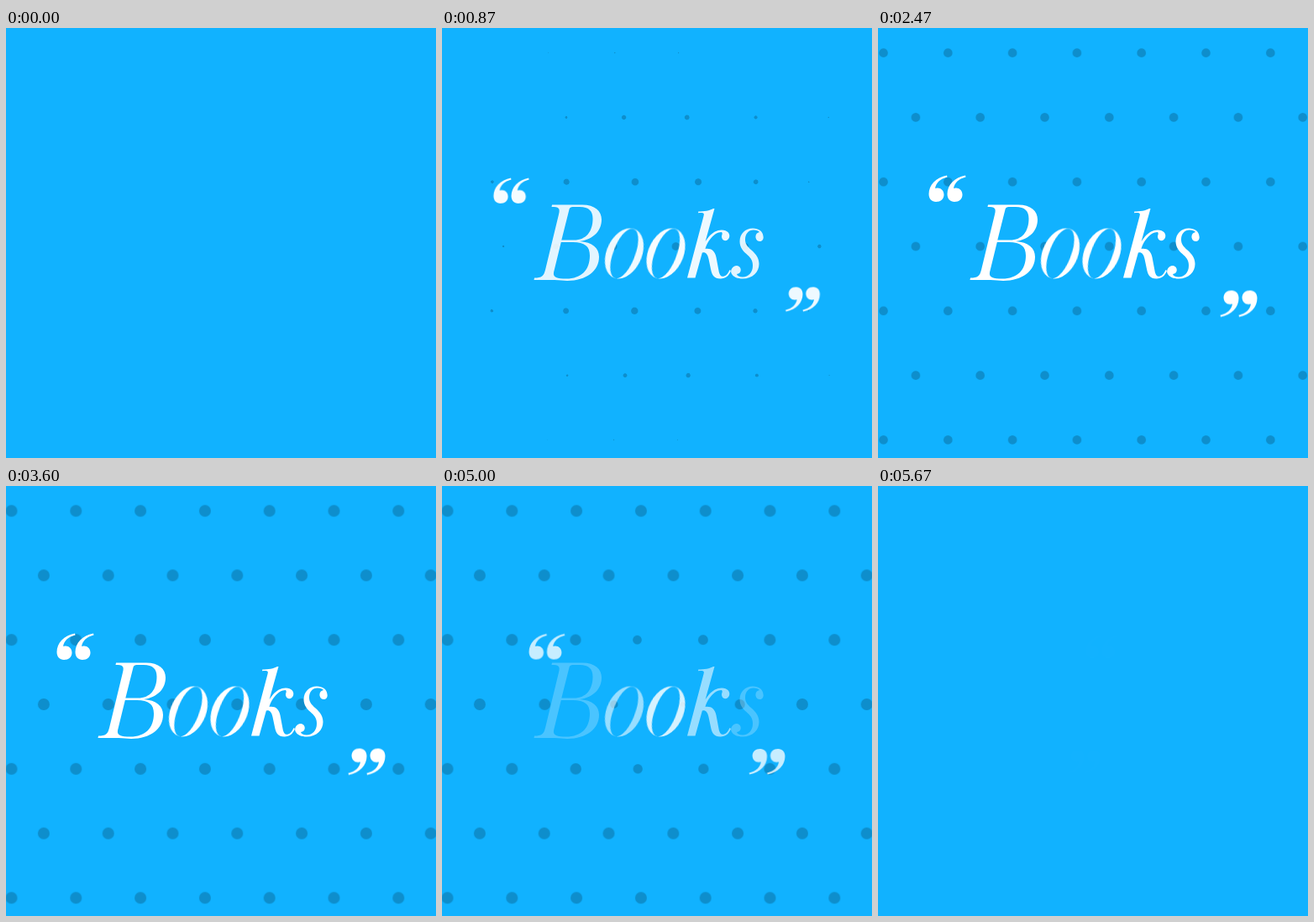
These frames come from a looping animation (512x512 px, 6.01 s). An HTML page:

```html
<!DOCTYPE html>
<html lang="en">
<head>
<meta charset="utf-8">
<title>Books</title>
<style>
  html, body { margin: 0; width: 100%; height: 100%; overflow: hidden; background: #11b2ff; }
  svg { display: block; width: 100vw; height: 100vh; }
  #dots { fill: #0e8ecc; }
  #word, #quotes { fill: #fff; fill-rule: evenodd; }
  #word path, #quotes path { opacity: 0; }
</style>
</head>
<body>
<svg viewBox="0 0 512 512" role="img" aria-label="“Books”">
  <g id="dots"></g>
  <g id="word"></g>
  <g id="quotes"></g>
</svg>
<script>
const LOOP = 6010;
const EASE = 'cubic-bezier(.25,.1,.25,1)';
const OUT_CUBIC = 'cubic-bezier(.215,.61,.355,1)';
const IO_QUAD = 'cubic-bezier(.455,.03,.515,.955)';
const IO_CUBIC = 'cubic-bezier(.645,.045,.355,1)';

function add(parent, tag, attrs) {
  const el = document.createElementNS('http://www.w3.org/2000/svg', tag);
  for (const key in attrs) el.setAttribute(key, attrs[key]);
  return document.getElementById(parent).appendChild(el);
}

// steps: [time in ms, properties, easing towards the next step]
function play(el, steps) {
  const frames = steps.map(([time, props, easing = 'linear']) =>
    ({ offset: Math.min(time / LOOP, 1), easing, ...props }));
  frames.unshift({ ...frames[0], offset: 0, easing: 'linear' });
  if (frames[frames.length - 1].offset < 1)
    frames.push({ ...frames[frames.length - 1], offset: 1 });
  el.animate(frames, { duration: LOOP, iterations: Infinity });
}

const place = (x, y, scale, turn = 0) =>
  ({ transform: `translate(${x}px, ${y}px) rotate(${turn}deg) scale(${scale})` });

// Dots: rows slide in opposite directions, rippling out from the centre
const PITCH = 76.8;
for (let row = 0; row < 7; row++) {
  const odd = row % 2, dir = odd ? 1 : -1;
  const y = 29.6 + row * PITCH;
  for (let col = 0; col < 7; col++) {
    const x = 6.5 + (col + odd / 2) * PITCH;
    const dist = Math.hypot(x - 256, y - 256);
    const enter = 317 + 2 * dist, leave = 4753 + 1.5 * dist;
    play(add('dots', 'circle', { r: 7 }), [
      [enter, place(x + dir * 36, y, 0), EASE],
      [enter + 800, place(x, y, .757)],
      [2400, place(x, y, .757)],
      [3070, place(x, y, .8)],
      [3300, place(x, y, 1)],
      [leave, place(x, y, 1), IO_QUAD],
      [leave + 405, place(x + dir * 19, y, 0)]
    ]);
  }
}

// Letters: the middle one appears first and fades last
const letterO = 'M-22 0A22 30 0 1 1 22 0A22 30 0 1 1-22 0ZM-13.4-1.4A13.5 28 6 1 0 13.4 1.4A13.5 28 6 1 0-13.4-1.4Z';
const letters = [
  { d: 'M131 210.5H167C182 210.5 190 218 190 228C190 241 181 251.5 164 254C179 255 187 262 187 272.5C187 289 172 301 149 301C145 301 140 300 134 300H109.5L110 297.5C119 297.5 121 295.5 123 288L139 222C141 214.5 139 213 130.5 213Z' +
       'M151.5 216C152 213.5 154 213 158 213H164C175 213 179.5 218 179.5 227C179.5 242 172 252.5 157 252.5H142.3Z' +
       'M141.8 255H156C170 255 176 260 176 271C176 288 166 298.5 148 298.5C137 298.5 132 297 133 291Z' },
  { d: letterO, transform: 'translate(217 268.5) skewX(-13)' },
  { d: letterO, transform: 'translate(266.5 268.5) skewX(-13)' },
  { d: 'M324.5 215L301.5 297.5H292L311.5 224C313 219.5 310 220 305 220.3L305.3 218.5C312 218.5 319 217.5 323 215Z' +
       'M306 272C312 252 322 240.5 333 240.5C340 240.5 343.5 245 342 249.5C340.5 254 335 254.5 333.5 250.5C332 246.5 335 245.5 333 243C324 243 316 254 313.5 263C320 262 325 265 326.5 273L329.5 289C330.5 295 333 296.5 336 295.5C339 294.5 341 291.5 342.5 288L344 289C341.5 295 338 298.5 331.5 298.5C324 298.5 321.5 294.5 320 287L317.5 275C316 268 313 266 308 268Z',
    'fill-rule': 'nonzero' },
  { d: 'M382.5 248C382 242 377 238.5 370 238.5C361 238.5 354.5 245 354.5 254C354.5 262 359 266 364 270.5C368 274 370 277.5 370 283C370 291 365 296.5 358 296.5C354 296.5 351.5 295 351 293C354.5 293 356.5 290 355.5 286.5C354.5 283 350.5 282 347.5 284C344.5 286 343.5 289.5 344.5 292C346.5 296.5 352 298.5 358 298.5C370 298.5 377.5 290.5 377.5 281C377.5 274 374 269.5 368.5 264.5C363.5 260 361 257 361 252C361 245 365 240.5 371 240.5C374.5 240.5 377 241.5 378 243C375 243.5 373 246 373.5 249.5C374 253.5 378 255 380.5 253.5C382.5 252 383 250 382.5 248Z' }
];
letters.forEach((attrs, i) => {
  const rank = Math.abs(i - 2);
  const enter = 130 + 100 * rank, leave = 4630 - 145 * rank;
  play(add('word', 'path', attrs), [
    [enter, { opacity: 0 }, OUT_CUBIC],
    [enter + 1070, { opacity: 1 }],
    [leave, { opacity: 1 }, IO_CUBIC],
    [leave + 1100, { opacity: 0 }]
  ]);
});

// Quote marks: grow away from the middle line, then close in sideways
const tick = 'c-13 2.5-21.5 11.5-21.5 22c0 6 3.5 9.5 8.5 9.5c5.5 0 9.5-3.5 9.5-8.5c0-5-3.5-8-7.5-8c-1 0-2.5.3-3 .5c1-6.5 6-11.5 14.5-13.5z';
const quote = `M0-15.5${tick}M22-15.5${tick}`;
function addQuote(x, y, turn, enter, slide) {
  const at = (px, py, scale, opacity) => ({ ...place(px, py, scale, turn), opacity });
  play(add('quotes', 'path', { d: quote }), [
    [enter, at(x, 256, 0, 0), OUT_CUBIC],
    [enter + 1070, at(x, y, 1, 1)],
    [4515, at(x, y, 1, 1), IO_CUBIC],
    [5815, at(x + slide, y, .87, 0)]
  ]);
}
addQuote(82, 191, 0, 130, 186);
addQuote(430, 328.5, 180, 230, -186);
</script>
</body>
</html>
```
